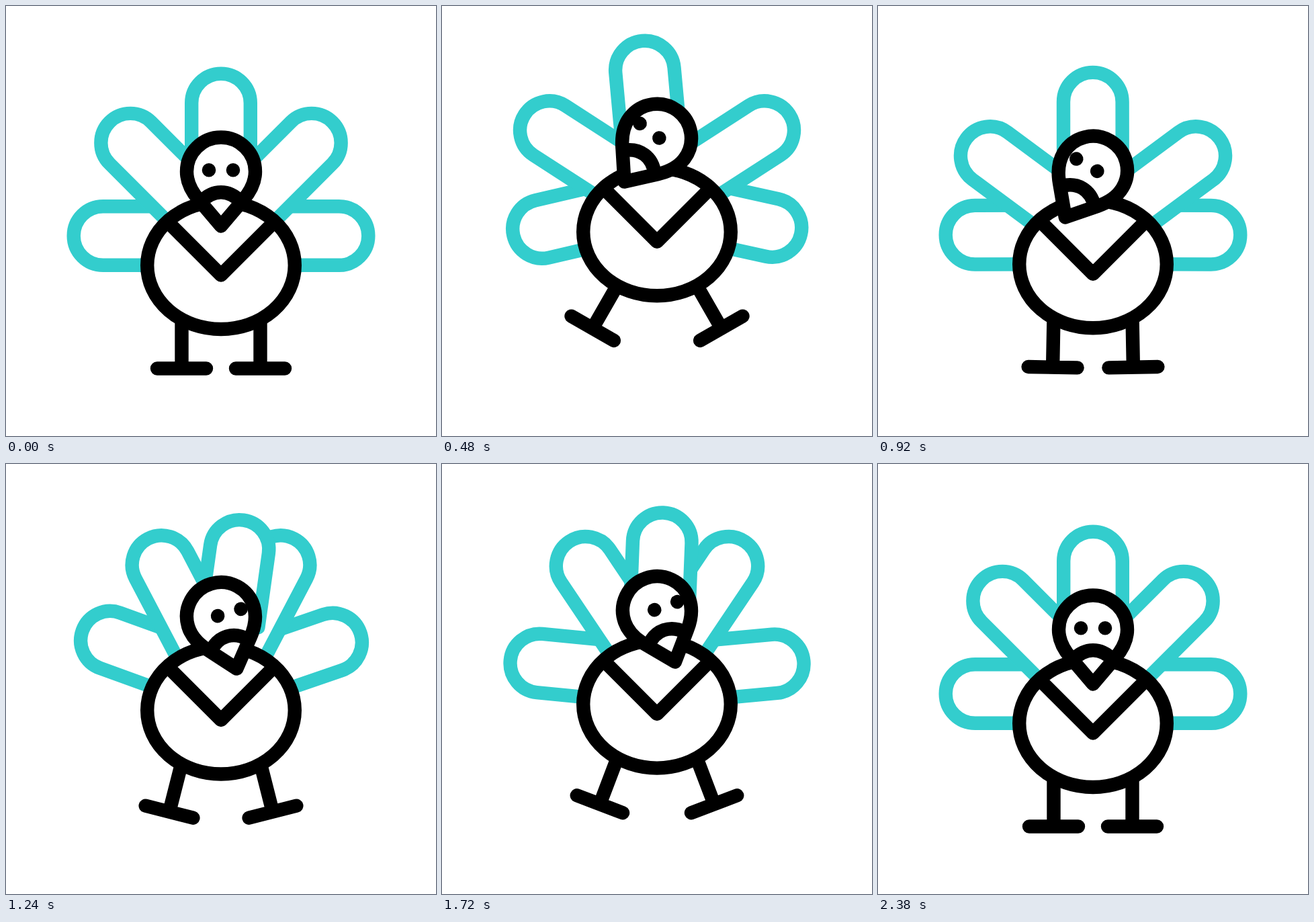
Write an HTML page that moves like this. It is 640 by 640 pixels and loops after 2400 ms.

```html
<!DOCTYPE html>
<html lang="en">
<head>
<meta charset="utf-8">
<title>Dancing turkey</title>
<style>
  html, body { margin: 0; width: 100%; height: 100%; overflow: hidden; background: #fff; }
  svg { display: block; width: 100%; height: 100%; }
</style>
</head>
<body>
<svg viewBox="0 0 640 640" fill="#fff" stroke="#000" stroke-width="20.4" stroke-linecap="round" stroke-linejoin="round">
  <g id="bird">
    <g id="tail" stroke="#33cdcd"></g>
    <path id="legL" d="M261.5 466V539.5M225 539.5H298"/>
    <path id="legR" d="M378.5 466V539.5M342 539.5H415"/>
    <ellipse cx="320" cy="386" rx="109.8" ry="95"/>
    <path d="M241 321.5L320 400.5L399 321.5" fill="none"/>
    <g id="head">
      <path d="M320 195.5C291.8 195.5 269 218.3 269 246.5C269 264 277 277 287 288.6L320 327.5L353 288.6C363 277 371 264 371 246.5C371 218.3 348.2 195.5 320 195.5Z"/>
      <path d="M291 291C300 281.5 309 277.3 320 277.3S340 281.5 349 291" fill="none"/>
      <g id="eyes" fill="#000" stroke="none">
        <circle cx="302" cy="244.3" r="10.3"/>
        <circle cx="338" cy="244.3" r="10.3"/>
      </g>
    </g>
  </g>
</svg>
<script>
const LOOP = 2400;
const $ = id => document.getElementById(id);
const move = (node, value) => node.setAttribute('transform', value);

// Smooth step from 0 to 1 between two times.
function ramp(t, from, to) {
  const s = Math.min(1, Math.max(0, (t - from) / (to - from)));
  return s * s * (3 - 2 * s);
}
const bump = (t, from, peak, to) => ramp(t, from, peak) - ramp(t, peak, to);

// Feathers drop, spring up past rest and settle.
function swing(t) {
  const low = 625, high = low + 662;
  return bump(t, low, high, high + 662) - 0.74 * bump(t, 0, low, high);
}

function feather({ angle, length, pivot = 342, end = 282, size, delay = 0 }) {
  const node = document.createElementNS('http://www.w3.org/2000/svg', 'path');
  node.setAttribute('d', `M276.2 ${end}V${pivot - length}a43.8 43.8 0 0 1 87.6 0V${end}`);
  $('tail').append(node);
  return t => {
    const late = t * 625 / (625 + delay);
    const time = t < 625 + delay ? late : t - delay;
    move(node, `rotate(${angle + size * swing(time)} 320 ${pivot})`);
  };
}
const feathers = [
  feather({ angle: -90, length: 175.5, size: 20.4 }),
  feather({ angle: 90, length: 175.5, size: -19.4 }),
  ...[-1, 1].map(side =>
    feather({ angle: 45 * side, length: 190.7, pivot: 338.5, size: -22.3 * side, delay: 102 })),
  feather({ angle: 0, length: 197.5, end: 256, size: 8.2 })
];

function draw(t) {
  const hop1 = bump(t, 0, 460, 980), hop2 = bump(t, 980, 1520, 2065);
  const leg = 30 * (hop1 + hop2);
  const turn = ramp(t, 817, 1317);
  const left = ramp(t, 0, 500) - turn, right = turn - ramp(t, 1620, LOOP);

  move($('bird'), `translate(0 ${-50 * hop1 - 41 * hop2})`);
  move($('legL'), `rotate(${leg} 261.5 464.5)`);
  move($('legR'), `rotate(${-leg} 378.5 464.5)`);
  move($('head'), `rotate(${37 * left - 20.3 * right} 320 246.5)`);
  move($('eyes'), `translate(${15.5 * (right - left)} 0)`);
  feathers.forEach(pose => pose(t));
}

const start = performance.now();
function frame() {
  draw((performance.now() - start) % LOOP);
  requestAnimationFrame(frame);
}
frame();
</script>
</body>
</html>
```
